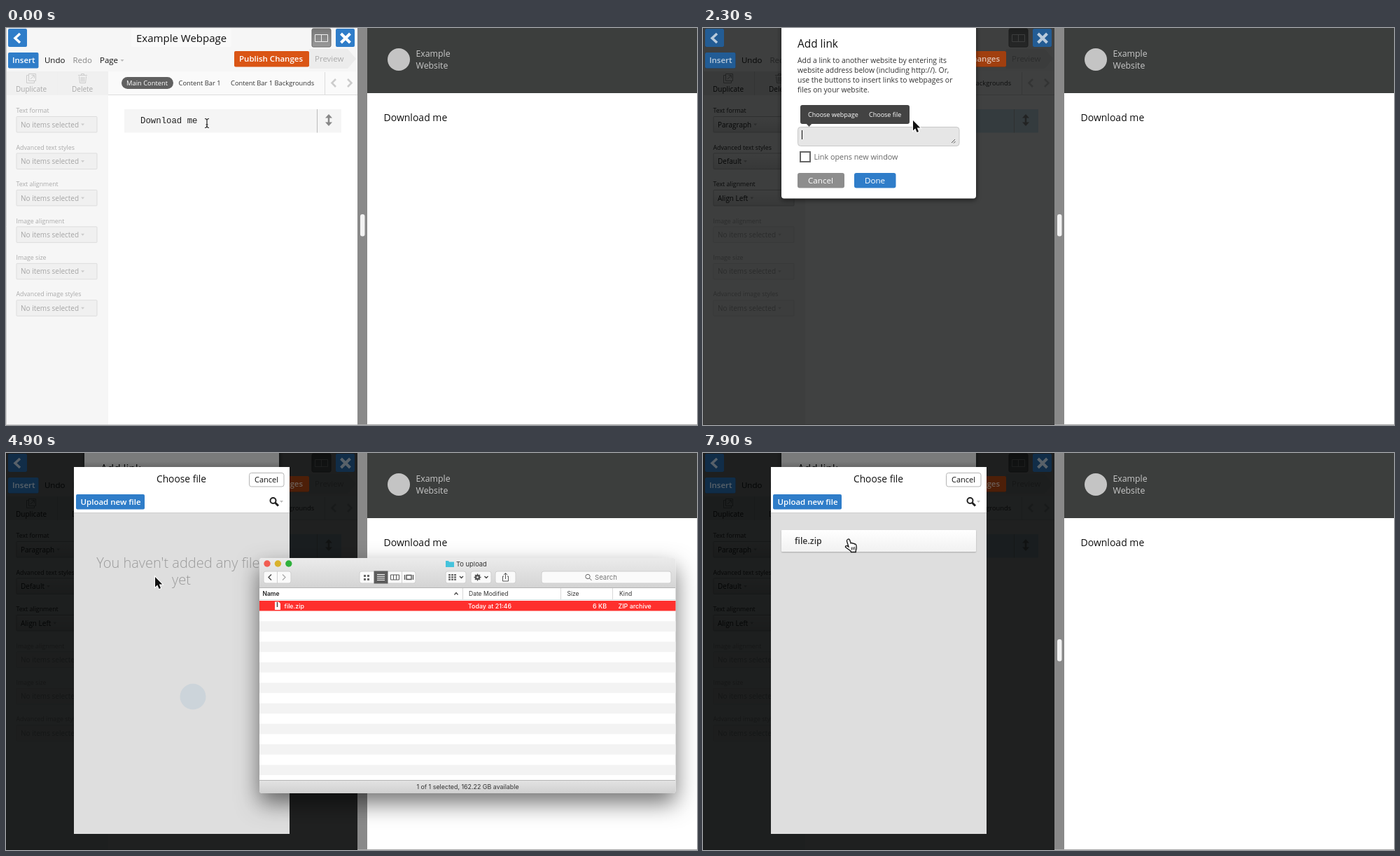
An HTML page with a canvas that plays this animation: 987 px wide and 567 px high, repeating every 8000 ms.

```html
<!DOCTYPE html>
<html lang="en">
<head>
<meta charset="utf-8">
<title>Link to a file</title>
<style>
  html, body { margin: 0; width: 100%; height: 100%; overflow: hidden; background: #fff; }
  canvas { display: block; }
</style>
</head>
<body>
<canvas id="stage" width="987" height="567"></canvas>
<script>
const ctx = document.getElementById('stage').getContext('2d');
const LOOP = 8000;
const SANS = '"Open Sans", sans-serif', INTER = 'Inter, sans-serif';
const SERIF = '"Noto Serif", serif', MONO = '"Liberation Mono", monospace';
const BLUE = '#2f7dc9', ORANGE = '#da5515';

const clamp = v => Math.max(0, Math.min(1, v));
const progress = (t, from, to) => clamp((t - from) / (to - from));
const ease = p => p < .5 ? 2 * p * p : 1 - 2 * (1 - p) * (1 - p);

function box(x, y, w, h, fill, r = 0, stroke) {
  ctx.beginPath();
  ctx.roundRect(x, y, w, h, r);
  ctx.fillStyle = fill;
  ctx.fill();
  if (stroke) {
    ctx.strokeStyle = stroke;
    ctx.lineWidth = 1;
    ctx.stroke();
  }
}

function gradient(y, h, top, bottom) {
  const g = ctx.createLinearGradient(0, y, 0, y + h);
  g.addColorStop(0, top);
  g.addColorStop(1, bottom);
  return g;
}

function fillPath(d, color) {
  ctx.fillStyle = color;
  ctx.fill(new Path2D(d));
}

function line(d, color, width = 1) {
  ctx.strokeStyle = color;
  ctx.lineWidth = width;
  ctx.stroke(new Path2D(d));
}

function circle(x, y, r, color) {
  ctx.beginPath();
  ctx.arc(x, y, r, 0, 7);
  ctx.fillStyle = color;
  ctx.fill();
}

// y is the middle of the capital letters; returns the width of the text.
function text(str, x, y, size, color = '#111', { style = '', font = SANS, align = 'left' } = {}) {
  ctx.font = `${style} ${size}px ${font}`;
  ctx.textAlign = align;
  ctx.fillStyle = color;
  ctx.fillText(str, x, y + size * .36);
  return ctx.measureText(str).width;
}

function layer(alpha, draw, dx = 0, dy = 0) {
  if (alpha <= 0) return;
  ctx.save();
  ctx.globalAlpha = alpha;
  ctx.translate(dx, dy);
  draw();
  ctx.restore();
}

function shadowed(color, blur, offset, draw) {
  ctx.save();
  ctx.shadowColor = color;
  ctx.shadowBlur = blur;
  ctx.shadowOffsetY = offset;
  draw();
  ctx.restore();
}

const dropArrow = (x, y, color) => fillPath(`M${x} ${y - 1}h5l-2.5 3z`, color);

function mainButtons() {
  box(3, 1, 27, 26, BLUE, 2);
  line('M20 8L13 14.5L20 21', '#fff', 3.5);
  box(471, 1, 27, 26, BLUE, 2);
  line('M478.5 8L491.5 21M491.5 8L478.5 21', '#fff', 4);
  box(3, 35, 43.5, 22.5, BLUE, 2);
  text('Insert', 9, 46, 11.5, '#fff', { style: '600' });
  box(326, 33, 107, 22.5, ORANGE, 2);
  text('Publish Changes', 333, 44, 11.5, '#fff', { style: '600' });
}

function toolbar() {
  box(0, 0, 502, 62, '#f6f6f6');
  box(179, 1, 143, 26, '#f9f9f9', 2);
  text('Example Webpage', 186, 14.5, 15);
  box(437, 1, 27, 26, gradient(1, 26, '#777', '#9a9a9a'), 2, '#666');
  line('M441.5 9.5h18v10h-18zM450.5 9.5v10', '#eee');
  fillPath('M433 30H488L500 44L488 58H433Z', '#ececec');
  mainButtons();
  text('Undo', 55, 46, 11.5);
  text('Redo', 95.5, 46, 11.5, '#888');
  text('Page', 134, 46, 11.5);
  dropArrow(163.5, 46, '#bbb');
  text('Preview', 441, 44, 11.5, '#aaa');

  box(146, 62, 356, 34, '#fafafa');
  line('M146 95.5H502M455.5 63V95', '#ddd');
  box(165, 70, 74, 17, '#606060', 8.5);
  text('Main Content', 172, 78.5, 9.35, '#fff');
  text('Content Bar 1', 246.5, 78.5, 9.35, '#333');
  text('Content Bar 1 Backgrounds', 321, 78.5, 9.35, '#333');
  line('M471 73L465.5 78.5L471 84M488 73L493.5 78.5L488 84', '#ccc', 2.5);
}

const FIELDS = [
  ['Text format', 'Paragraph'], ['Advanced text styles', 'Default'], ['Text alignment', 'Align Left'],
  ['Image alignment'], ['Image size'], ['Advanced image styles']
];

function sidebar(active) {
  box(0, 62, 146, 505, active ? '#f2f2f2' : '#f6f6f6');
  box(0, 62, 146, 34, active ? '#e4e4e4' : '#f0f0f0');
  line('M73.5 62V96', active ? '#ccc' : '#eee');
  const ink = active ? '#111' : '#aaa', icon = active ? '#888' : '#ccc';
  line('M32 67.5H29.5V78.5H40.5V76M32.5 65.5h10v10h-10zM35 73L40 68M36.5 67.5H40.5V71.5', icon);
  line('M103 67.5H116M107.5 67V65.5H111.5V67M104.5 69L105.5 78.5H113.5L114.5 69M107.5 70V77M109.5 70V77M111.5 70V77', icon);
  text('Duplicate', 14, 87.5, 10, ink);
  text('Delete', 94, 87.5, 10, ink);
  FIELDS.forEach(([label, value], i) => {
    const y = 118 + i * 52.45, on = active && value;
    text(label, 14.5, y, 8.8, on ? '#222' : '#aaa');
    box(15, y + 8.5, 115, 22.5, on ? gradient(y + 8, 23, '#f7f7f7', '#dadada') : '#f0f0f0', 1, on ? '#bbb' : '#ddd');
    const width = text(on ? value : 'No items selected', 21, y + 20, 10, on ? '#111' : '#a5a5a5');
    dropArrow(24 + width, y + 19.5, on ? '#aaa' : '#ccc');
  });
}

function editor(focused, selected) {
  box(146, 96, 356, 471, '#fff');
  box(169, 116, 310, 33.5, focused ? '#cfe6f2' : '#f5f5f5', 1);
  if (selected) box(192, 125, 81.5, 14.5, '#56a0e8');
  text('Download me', 192, 132, 12.35, '#222', { font: MONO });
  line('M444.5 116V149.5', '#bbb');
  line('M461 126V137', '#888', 2.5);
  fillPath('M461 123L466 128.5H456ZM461 140L466 134.5H456Z', '#888');
}

function formatBar() {
  shadowed('rgba(0,0,0,.6)', 5, 1, () => box(169, 149.5, 188, 26, gradient(149, 26, '#343434', '#202020'), 1));
  fillPath('M231 150L237 143.5L243 150Z', '#343434');
  text('Bold', 178, 164, 10, '#fff', { style: 'bold', font: SERIF });
  text('Italics', 212.5, 164, 10, '#fff', { style: 'italic', font: SERIF });
  text('Underline', 252, 164, 10, '#fff');
  line('M252 169.5H298', '#fff');
  text('Link', 308, 164, 10, '#fff');
  fillPath('M341 159.5L346 164.5L341 169.5Z', '#aaa');
}

function preview() {
  box(502, 0, 14, 567, '#898989');
  box(506, 266, 6.5, 31.5, '#f2f2f2', 3);
  box(516, 0, 471, 567, '#fff');
  box(516, 0, 471, 93, '#3c3e3d');
  circle(561, 45, 16, '#c4c4c4');
  text('Example', 585.5, 37, 12.3, '#c8c8c8');
  text('Website', 585.5, 53.5, 12.3, '#c8c8c8');
  text('Download me', 539.5, 128, 14);
}

function linkDialog(caret) {
  shadowed('rgba(0,0,0,.6)', 7, 2, () => box(112, -10, 278, 253.5, '#fff', 4));
  text('Add link', 135, 22, 15.4);
  ['Add a link to another website by entering its',
   'website address below (including http://). Or,',
   'use the buttons to insert links to webpages or',
   'files on your website.'].forEach((s, i) => text(s, 135, 46.5 + i * 13.9, 10.4, '#333'));
  box(139, 110, 156, 27, '#434343', 3);
  fillPath('M147 136H156L151.5 141Z', '#434343');
  text('Choose webpage', 150, 123.5, 9, '#fff');
  text('Choose file', 237, 123.5, 9, '#fff');
  box(135.5, 141.5, 230.5, 27, '#e6e6e6', 4, '#c8c8c8');
  line('M355 164L360 159M358 164.5L360.5 162', '#555');
  if (caret) line('M141.5 146V159', '#111');
  box(139, 177, 14, 14, '#fff', 1, '#666');
  line('M139 177h14v14h-14z', '#666', 2);
  text('Link opens new window', 158.5, 184, 10.8, '#666');
  box(135, 207, 67, 21.5, '#8d8d8d', 3);
  text('Cancel', 150, 218, 11.6, '#fff');
  box(216, 207, 59.5, 21.5, BLUE, 3);
  text('Done', 231, 218, 11.6, '#fff');
}

function filePanel(t) {
  box(97, 20, 308, 524, '#dedede');
  box(97, 20, 308, 65, '#fff');
  line('M97 85.5H405', '#ccc');
  text('Choose file', 250.5, 37.5, 13.8, '#111', { align: 'center' });
  box(347.5, 28.5, 49.5, 19.5, '#fff', 3, '#b5b5b5');
  text('Cancel', 355, 38.5, 11);
  box(100, 59, 98, 21.5, BLUE, 2);
  text('Upload new file', 106.5, 69.5, 11.5, '#fff', { style: '600' });
  ctx.beginPath();
  ctx.arc(381.5, 68, 4, 0, 7);
  ctx.strokeStyle = '#222';
  ctx.lineWidth = 2;
  ctx.stroke();
  line('M384.5 71L389 75.5', '#222', 3);
  dropArrow(391, 69, '#bbb');

  const listed = progress(t, 4900, 5200);
  layer(1 - listed, () => {
    const opts = { style: '300', align: 'center' };
    text("You haven't added any files", 250.5, 157, 20, '#9a9a9a', opts);
    text('yet', 250.5, 180.5, 20, '#9a9a9a', opts);
  });
  if (t >= 4900) layer(1 - listed, () => circle(267, 348, 18.5 + 6 * listed, '#ccd4da'));
  layer(listed, () => {
    shadowed('rgba(0,0,0,.25)', 2, 1, () => box(112, 110, 278, 31, gradient(110, 31, '#fff', '#f1f1f1'), 1));
    text('file.zip', 131, 126, 12.3, '#333', { style: '600' });
  });
}

function fileIcon() {
  fillPath('M384 212.5H389.5L392 215V224H384Z', '#fff');
  line('M387.5 213V220', '#444', 1.5);
}

function fileWindow() {
  const inter = { font: INTER }, medium = { font: INTER, style: '500' };
  shadowed('rgba(0,0,0,.55)', 32, 14, () => box(362, 150, 594.5, 336, '#fff', 4));
  box(362, 150, 594.5, 42, gradient(150, 42, '#ebebeb', '#d4d4d4'), [4, 4, 0, 0]);
  ['#f25d52', '#d9b22c', '#2fb13c'].forEach((color, i) => circle(373 + i * 15.4, 158, 4.7, color));
  fillPath('M628 154H632L633 155.5H640V163H628Z', '#45c3dc');
  text('To upload', 643, 158.5, 9.4, '#333', inter);
  [[368, 39], [505, 80], [628, 29], [664, 29], [699, 29], [765, 185]]
    .forEach(([x, w]) => box(x, 169, w, 17, '#fafafa', 3, '#cfcfcf'));
  line('M387.5 169V186M565.5 169V186', '#d0d0d0');
  line('M379 173.5L375 177.5L379 181.5', '#444', 1.3);
  line('M395 173.5L399 177.5L395 181.5', '#aaa', 1.3);
  box(525.5, 168.5, 20, 18, '#5c5c5c');
  for (const y of [173.5, 176.2, 178.9, 181.6]) line(`M530 ${y}H541`, '#fff');
  for (const x of [511, 516]) for (const y of [174, 179]) box(x, y, 3, 3, '#666');
  line('M549.5 174H561.5V181H549.5ZM553.5 174V181M557.5 174V181', '#555');
  line('M572 174.5H579V180.5H572ZM569.5 174V181M581.5 174V181', '#555', 1.4);
  for (let i = 0; i < 9; i++) box(632 + i % 3 * 4, 173 + (i / 3 | 0) * 3.3, 3, 2.2, '#666');
  line('M648 176L650.5 178.5L653 176M683.5 176L686 178.5L688.5 176', '#444', 1.3);
  circle(673.5, 177.5, 3.8, '#555');
  line('M668.5 177.5h10M673.5 172.5v10M670 174l7 7M677 174l-7 7', '#555', 1.5);
  circle(673.5, 177.5, 1.3, '#fafafa');
  line('M711 176H709.5V183H717.5V176H716M713.5 180V172M711 174L713.5 171.5L716 174', '#555');
  ctx.beginPath();
  ctx.arc(831, 176.5, 3.2, 0, 7);
  ctx.strokeStyle = '#666';
  ctx.stroke();
  line('M833.5 179L836.5 182', '#666');
  text('Search', 841, 177.5, 9.6, '#777', inter);

  line('M362 192.5H956', '#b5b5b5');
  line('M362 209.5H956M652.5 193V209M792.5 193V209M866.5 193V209', '#d8d8d8');
  text('Name', 366.5, 201, 8.5, '#222', { font: INTER, style: '600' });
  line('M640.5 202.5L643 199.5L645.5 202.5', '#444', 1.2);
  text('Date Modified', 661, 201, 8.5, '#333', inter);
  text('Size', 801.5, 201, 8.5, '#333', inter);
  text('Kind', 876, 201, 8.5, '#333', inter);
  for (let row = 2; row < 18; row += 2) box(362, 211 + row * 14.65, 594.5, 14.65, '#f3f3f3');
  box(362, 211, 594.5, 14.5, '#fe302d');
  fileIcon();
  text('file.zip', 397.5, 218.5, 8.9, '#fff', medium);
  text('Today at 21:46', 660, 218.5, 8.9, '#fff', medium);
  text('6 KB', 858, 218.5, 8.9, '#fff', { ...medium, align: 'right' });
  text('ZIP archive', 874.5, 218.5, 8.9, '#fff', medium);
  box(362, 467, 594.5, 19, gradient(467, 19, '#e4e4e4', '#d0d0d0'), [0, 0, 4, 4]);
  line('M362 467.5H956', '#b5b5b5');
  text('1 of 1 selected, 162.22 GB available', 659.5, 477, 8.9, '#333', { ...inter, align: 'center' });
}

const CURSORS = {
  beam() {
    line('M-3 -6.5Q0 -6.5 0 -4V4Q0 6.5 -3 6.5M3 -6.5Q0 -6.5 0 -4M0 4Q0 6.5 3 6.5M-1.5 2H1.5', '#222', 1.2);
  },
  arrow() {
    const d = 'M0 0V14.5L3.3 11.5L5.6 17L8 16L5.8 10.6H10.3Z';
    line(d, '#fff', 2);
    fillPath(d, '#111');
  },
  hand() {
    const d = 'M-1.5 .5Q.5 -1 1.5 1L3.2 6Q5 4.7 6 6.4Q7.7 5.4 8.5 7.2Q10.4 6.5 10.8 8.6Q12 14 10.3 16V18.5H3.5L3 17Q-1 14 -4.5 11.5Q-5 9 -2 9.7L0 11L-2.5 3Q-2.8 1 -1.5 .5Z';
    fillPath(d, '#fff');
    line(d, '#111', 1.3);
    line('M4 11.5L4.6 15.5M6.3 11.3L6.8 15.3M8.6 11L9 15', '#111');
  }
};

// time, x, y, shape from that time on
const POINTER = [
  [0, 287, 136, 'beam'], [300, 287, 136, 'beam'], [600, 264, 135, 'beam'], [1100, 264, 135, 'beam'],
  [1200, 280, 145, 'arrow'], [1300, 318, 157, 'hand'], [1400, 306, 159, 'hand'], [2100, 306, 159, 'arrow'],
  [2300, 300, 132, 'arrow'], [2500, 284, 138, 'arrow'], [2700, 264, 122, 'hand'], [2800, 261, 119, 'hand'],
  [3300, 261, 119, 'hand'], [3600, 150, 66, 'hand'], [3700, 150, 66, 'hand'], [3900, 400, 217, 'hand'],
  [4000, 400, 217, 'hand'], [4100, 385, 214, 'arrow'], [4600, 213, 177, 'arrow'], [4900, 213, 177, 'arrow'],
  [5300, 318, 178, 'arrow'], [5500, 318, 178, 'arrow'], [5800, 179, -8, 'arrow'], [6100, 179, -8, 'arrow'],
  [6300, 175, -9, 'arrow'], [6700, 175, -9, 'arrow'], [6900, 178, -20, 'arrow'], [7000, 196, -20, 'arrow'],
  [7400, 205, 90, 'arrow'], [7600, 214, 127, 'hand'], [7700, 214, 127, 'hand'], [7900, 208, 123, 'hand'], [8000, 208, 123, 'hand']
];

function pointerAt(t) {
  const i = POINTER.findIndex((key, n) => n === POINTER.length - 1 || t < POINTER[n + 1][0]);
  const [t0, x0, y0, shape] = POINTER[i];
  const [t1, x1, y1] = POINTER[i + 1];
  const p = progress(t, t0, t1);
  return { x: x0 + (x1 - x0) * p, y: y0 + (y1 - y0) * p, shape };
}

function dim(alpha) {
  ctx.fillStyle = `rgba(0,2,2,${alpha})`;
  ctx.fillRect(0, 0, 502, 567);
}

function render(t) {
  const dialog = ease(progress(t, 1700, 2200));
  const panel = ease(progress(t, 3200, 3600));
  const pointer = pointerAt(t);

  toolbar();
  sidebar(t >= 400);
  editor(t >= 300, t >= 600);
  if (t < 2000) layer(progress(t, 600, 900), formatBar);
  line('M.5 0V567M0 566.5H502', '#ccc');

  dim(.75 * dialog * dialog);
  layer(.65 * dialog * dialog, mainButtons);
  const caret = t < 2600 || t % 1000 < 500;
  layer(Math.sqrt(dialog), () => linkDialog(caret), 0, 244 * (dialog - 1));

  dim(.52 * panel);
  if (panel) {
    if (panel === 1) dimDialogStrip();
    layer(Math.sqrt(panel), () => filePanel(t), 0, 544 * (panel - 1));
  }
  preview();
  line('M502 566.5H987', '#aaa');

  if (t >= 3700) layer(1 - progress(t, 6000, 6200), fileWindow);
  if (t >= 4100 && t < 4600) {
    layer(.6, () => {
      fileIcon();
      text('file.zip', 397.5, 218.5, 8.9, '#222', { font: INTER });
    }, pointer.x - 388, pointer.y - 216);
  }
  layer(1, CURSORS[pointer.shape], pointer.x, pointer.y);
}

// Soft shade that the file panel casts on the dialog behind it.
function dimDialogStrip() {
  box(112, 12, 278, 8, gradient(12, 8, 'rgba(0,0,0,0)', 'rgba(0,0,0,.15)'));
}

function tick() {
  const t = performance.now() % LOOP;
  render(Math.floor(t / 100) * 100);
  requestAnimationFrame(tick);
}
tick();
</script>
</body>
</html>
```
